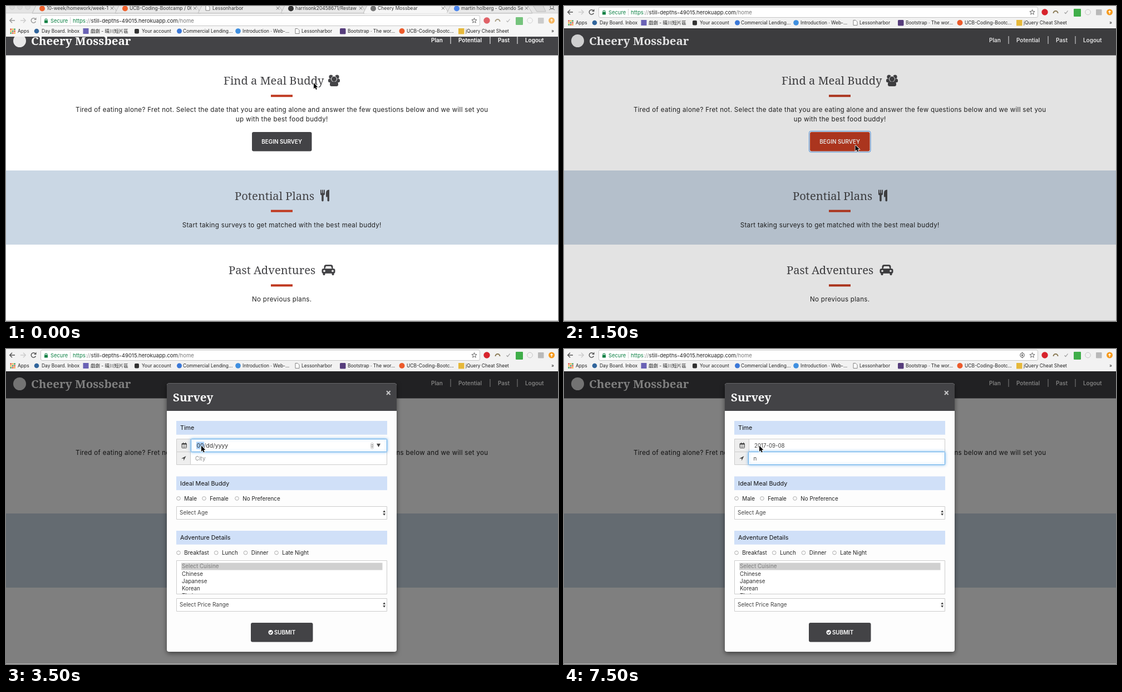
An HTML page with a canvas that plays this animation: 992x565 px, repeating every 8 s.

```html
<!DOCTYPE html>
<html lang="en">
<head>
<meta charset="utf-8">
<title>Meal survey</title>
<style>
html, body { margin: 0; width: 100%; height: 100%; overflow: hidden; background: #fff; }
canvas { display: block; width: 992px; height: 565px; }
</style>
</head>
<body>
<canvas id="stage"></canvas>
<script>
const W = 992, H = 565, LOOP = 8000;
const DARK = '#434346', RED = '#c03b22', BLUE = '#cad7e4', BAR = '#d0e0f8', RING = '#66afe9';
const SANS = 'Inter, "Noto Sans CJK TC", "Noto Sans CJK", sans-serif';
const SERIF = '"Noto Serif", serif';
const ratio = window.devicePixelRatio || 1;

function surface(el) {
  el.width = W * ratio;
  el.height = H * ratio;
  const ctx = el.getContext('2d');
  ctx.scale(ratio, ratio);
  return ctx;
}
const main = surface(document.getElementById('stage'));
const layer = surface(document.createElement('canvas'));
let c = main;

// Value of the last step that has begun
const at = (t, steps) => steps.reduce((v, s) => t >= s[0] ? s[1] : v, steps[0][1]);

function rect(x, y, w, h, fill) { c.fillStyle = fill; c.fillRect(x, y, w, h); }

function round(x, y, w, h, r, fill, stroke) {
  c.beginPath();
  c.roundRect(x, y, w, h, r);
  if (fill) { c.fillStyle = fill; c.fill(); }
  if (stroke) { c.strokeStyle = stroke; c.lineWidth = 1; c.stroke(); }
}

function dot(x, y, r, fill, stroke, width = 1) {
  c.beginPath();
  c.arc(x, y, r, 0, Math.PI * 2);
  if (fill) { c.fillStyle = fill; c.fill(); }
  if (stroke) { c.strokeStyle = stroke; c.lineWidth = width; c.stroke(); }
}

function path(pts, fill, stroke, width = 1) {
  c.beginPath();
  for (let i = 0; i < pts.length; i += 2) c.lineTo(pts[i], pts[i + 1]);
  if (fill) { c.closePath(); c.fillStyle = fill; c.fill(); }
  if (stroke) { c.strokeStyle = stroke; c.lineWidth = width; c.stroke(); }
}

function text(s, x, y, size, color, o = {}) {
  c.font = `${o.weight || 400} ${size}px ${o.serif ? SERIF : SANS}`;
  c.letterSpacing = (o.gap || 0) + 'px';
  c.textAlign = o.align || 'left';
  c.fillStyle = color;
  c.fillText(s, x, y);
  return c.measureText(s).width;
}

/* Browser bar */

function tabs() {
  rect(0, -15, W, 13, '#e4e4e4');
  [2, 16, 30].forEach(x => dot(x + 9, -13, 4.3, '#dcdcdc', '#cfcfcf'));
  const list = [
    [50, '#f0622d', '10-week/homework/week-1'],
    [199, '#f0622d', 'UCB-Coding-Bootcamp / 06'],
    [348, null, 'Lessonharbor'],
    [497, '#333', 'harrisonk20458671/Restaw'],
    [645, '#777', 'Cheery Mossbear'],
    [795, '#4c86ee', 'martin holberg - Quendo Sea']
  ];
  list.forEach(([x, icon, label], i) => {
    const open = i === 4;
    path([x - 3, -2, x + 4, -16, x + 142, -16, x + 151, -2], open ? '#f6f6f6' : '#e9e9e9', '#bbb');
    if (icon) dot(x + 15, -10.5, 5, icon); else page(x + 11, -16);
    c.save();
    c.beginPath();
    c.rect(x + 22, -16, 112, 14);
    c.clip();
    text(label, x + 23, -8, 8.5, '#333');
    c.restore();
    path([x + 138, -13.5, x + 143, -8.5], null, '#666');
    path([x + 143, -13.5, x + 138, -8.5], null, '#666');
  });
  path([947, -16, 954, -5, 970, -5, 965, -16], '#dadada', '#bbb');
  dot(981, -13, 3, null, '#666');
  path([976, -8, 979, -10, 983, -10, 986, -8], null, '#666');
  if (true) rect(0, -2.5, W, 0.7, '#c4c4c4');
  rect(644, -3, 152, 1.5, '#f6f6f6');
}

function page(x, y) {
  path([x, y, x + 4, y, x + 7, y + 3, x + 7, y + 9, x, y + 9, x, y], '#fff', '#666', 0.8);
}

function extensions() {
  dot(864, 11, 5.7, '#d7232c');
  c.beginPath();
  c.arc(883.5, 13, 4, Math.PI, 0);
  c.strokeStyle = '#8a7a55';
  c.lineWidth = 2;
  c.stroke();
  path([899.5, 11.5, 901.5, 13.5, 905.5, 8.5], null, '#999', 1.2);
  round(916, 5, 13, 14, 1, '#3fae49');
  dot(941.5, 11, 4.8, null, '#c4c4c4');
  round(956, 6, 10.5, 10.5, 1, '#b9b9b9');
  dot(980.5, 11, 5.5, '#f79a1c');
  path([980.5, 14, 980.5, 8.5], null, '#fff', 1.4);
  path([977.6, 11, 980.5, 8, 983.4, 11], '#fff');
}

function address(t, active) {
  const ink = active ? '#555' : '#999';
  path([16, 11, 7, 11], null, ink, 1.5);
  path([11, 6.8, 6.8, 11, 11, 15.2], null, ink, 1.5);
  path([26, 11, 35, 11], null, '#ccc', 1.5);
  path([31, 6.8, 35.2, 11, 31, 15.2], null, '#ccc', 1.5);
  c.beginPath();
  c.arc(49.5, 11, 4.2, 0.4, 5.4);
  c.strokeStyle = ink;
  c.lineWidth = 1.5;
  c.stroke();
  path([54.5, 5.5, 54.5, 10, 50, 10], ink);

  round(62.5, 2, 789, 18.5, 2.5, '#fff', '#c6c6c6');
  const green = '#0b8043';
  rect(69, 10.5, 6, 5, green);
  c.beginPath();
  c.arc(72, 10, 2, Math.PI, 0);
  c.strokeStyle = green;
  c.lineWidth = 1.1;
  c.stroke();
  text('Secure', 80, 14.5, 9.4, green);
  rect(115, 5, 0.8, 12, '#ccc');
  let x = 120;
  [['https', green], ['://', '#888'], ['still-depths-49015.herokuapp.com', '#222'], ['/home', '#777']]
    .forEach(([s, color]) => { x += text(s, x, 14.5, 9.6, color); });

  if (t >= 6000) {
    dot(823.5, 11, 3.8, null, '#555');
    dot(823.5, 11, 1.6, '#555');
    path([823.5, 5.5, 823.5, 7.5], null, '#555');
    path([823.5, 14.5, 823.5, 16.5], null, '#555');
  }
  const star = [];
  for (let i = 0; i <= 10; i++) {
    const r = i % 2 ? 2 : 4.8, a = i * Math.PI / 5 - Math.PI / 2;
    star.push(841.5 + r * Math.cos(a), 11.3 + r * Math.sin(a));
  }
  path(star, null, '#555', 0.9);
}

function bookmarks() {
  const hues = ['#e0493a', '#f0a92e', '#3b9e58'];
  for (let i = 0; i < 9; i++) rect(7.5 + i % 3 * 3.4, 25.5 + Math.floor(i / 3) * 3.4, 2.5, 2.5, hues[(i + Math.floor(i / 3)) % 3]);
  dot(55, 30, 4.3, '#31659c');
  round(138.5, 25, 10, 10, 0, '#6a62b5');
  round(231, 26, 8, 8.5, 2, '#333');
  dot(311.5, 30, 4.5, '#3b78d8');
  dot(417, 30, 4.8, '#3f8fe0');
  page(520, 25.5);
  round(600, 25, 10.5, 10.5, 1.5, '#563d7c');
  dot(711.5, 30, 5, '#ec5a2b');
  round(813, 25, 10.5, 10.5, 0, '#e6b83a');
  [[21, 'Apps'], [64, 'Day Board. Inbox'], [152, '戲劇 - 晴川短片區'], [244, 'Your account'],
    [318, 'Commercial Lending...'], [425, 'Introduction · Web-...'], [531, 'Lessonharbor'],
    [614, 'Bootstrap · The wor...'], [720, 'UCB-Coding-Bootc...'], [826, 'jQuery Cheat Sheet'], [980, '»']]
    .forEach(([x, s]) => text(s, x, 33.2, 8.45, '#222'));
}

function browser(t) {
  const active = t >= 1000;
  c.save();
  c.translate(0, t < 250 ? 15 : 0);
  rect(0, -15, W, 55, active ? '#f2f2f2' : '#f6f6f6');
  tabs();
  address(t, active);
  c.globalAlpha = active ? 1 : 0.7;
  extensions();
  c.globalAlpha = 1;
  bookmarks();
  c.restore();
}

/* Page */

function people(x, y) {
  [5, 16].forEach(dx => dot(x + dx, y + 4, 3.6, DARK));
  round(x, y + 7.5, 7, 6.5, 2.5, DARK);
  round(x + 14, y + 7.5, 7, 6.5, 2.5, DARK);
  dot(x + 10.5, y + 8, 5, DARK, '#fff', 0.9);
  round(x + 3, y + 12.5, 15, 8.5, [4, 4, 3, 3], DARK);
}

function cutlery(x, y) {
  [0, 3, 6].forEach(dx => round(x + dx, y, 1.9, 9, 0.9, DARK));
  round(x, y + 6, 7.9, 4, [0, 0, 3, 3], DARK);
  round(x + 2.2, y + 8, 3.5, 13, 1.7, DARK);
  c.beginPath();
  c.moveTo(x + 16, y);
  c.quadraticCurveTo(x + 10, y, x + 10, y + 6);
  c.lineTo(x + 10, y + 13);
  c.lineTo(x + 12.5, y + 13);
  c.lineTo(x + 12.5, y + 20);
  c.quadraticCurveTo(x + 14.5, y + 22, x + 16, y + 20);
  c.fillStyle = DARK;
  c.fill();
}

function car(x, y) {
  round(x + 4, y, 16, 10, [4, 4, 0, 0], DARK);
  path([x + 7.5, y + 2.8, x + 16.5, y + 2.8, x + 18, y + 7, x + 6, y + 7], '#fff');
  round(x, y + 7, 24, 8.8, 3, DARK);
  [2, 18].forEach(dx => round(x + dx, y + 13, 4, 6, 1.8, DARK));
  [4.5, 19.5].forEach(dx => dot(x + dx, y + 11.2, 1.8, '#fff'));
}

function section(title, x, base, icon) {
  text(title, x, base, 20.2, DARK, { serif: true, weight: 500 });
  icon();
  rect(476, base + 18.2, 39, 4, RED);
}

function ring(x, y, w, h, blur) {
  c.save();
  c.shadowColor = 'rgba(90,165,235,.75)';
  c.shadowBlur = blur * ratio;
  round(x, y, w, h, 1, '#fff', RING);
  c.restore();
}

function site(t) {
  rect(0, 0, W, H, '#fff');
  rect(0, 40, W, 48.5, DARK);
  dot(24.5, 62.5, 11.5, '#e8e8e8');
  text('Cheery Mossbear', 45, 70, 20.6, '#fff', { serif: true, weight: 600 });
  [[764, 'Plan'], [813, 'Potential'], [884, 'Past'], [933, 'Logout']]
    .forEach(([x, s]) => text(s, x, 64.5, 9.95, '#fff', { weight: 600 }));
  [798.5, 869.5, 918.5].forEach(x => rect(x, 54, 1, 14, '#fff'));
  rect(0, 295, W, 133, BLUE);

  section('Find a Meal Buddy', 391, 141, () => people(579, 123));
  section('Potential Plans', 411, 347.5, () => cutlery(565, 329.5));
  section('Past Adventures', 400, 481, () => car(567.5, 464));
  const body = (s, y) => text(s, 495.7, y, 11.6, '#222', { gap: 0.3, align: 'center' });
  body('Tired of eating alone? Fret not. Select the date that you are eating alone and answer the few questions below and we will set you', 190);
  body('up with the best food buddy!', 207);
  body('Start taking surveys to get matched with the best meal buddy!', 396.5);
  body('No previous plans.', 529.5);

  if (t >= 1500) round(440.5, 224.5, 110.5, 37.5, 3, '#fff', '#4f9cf0');
  round(442, 226, 107.5, 34.5, 3, t >= 1250 && t < 1750 ? RED : DARK);
  text('BEGIN SURVEY', 495.7, 246.6, 9.9, '#fff', { weight: 600, align: 'center' });

  const shade = at(t, [[0, 0], [1500, 0.11], [1750, 0.5]]);
  rect(0, 40, W, 525, `rgba(0,0,0,${shade})`);
  rect(0, 564, W, 1, '#b4b4b4');
}

/* Survey dialog */

function bar(label, y) {
  rect(306, y, 379, 24.7, BAR);
  text(label, 313, y + 16.3, 10.8, '#111');
}

function box(x, y, w, h, fill = '#fff') { round(x + 0.5, y + 0.5, w - 1, h - 1, 0, fill, '#ccc'); }

function options(y, list) {
  list.forEach(([x, s]) => {
    dot(x, y, 3.3, '#fff', '#a2a2a2', 0.9);
    text(s, x + 10.3, y + 3.6, 9.9, '#222');
  });
}

function menu(label, y) {
  box(306, y, 379, 24);
  text(label, 312, y + 15.2, 9.95, '#444');
  path([677.3, y + 11, 679.7, y + 7.3, 682, y + 11], '#444');
  path([677.3, y + 13, 679.7, y + 16.7, 682, y + 13], '#444');
}

function dateField(t) {
  if (t >= 6000) {
    text('2017-09-08', 342, 176.6, 9.7, '#444');
    return;
  }
  const [value, picked] = at(t, [
    [0, ['mm/dd/yyyy', -1]], [3000, ['mm/dd/yyyy', 0]], [3500, ['00/dd/yyyy', 0]],
    [3750, ['09/dd/yyyy', 1]], [4000, ['09/00/yyyy', 1]], [4500, ['09/08/yyyy', 2]],
    [5250, ['09/08/0002', 2]], [5500, ['09/08/0020', 2]], [5750, ['09/08/0201', 2]]
  ]);
  let x = 342.5;
  value.split('/').forEach((part, i) => {
    if (i) x += text('/', x, 176.6, 10.4, '#444');
    if (i === picked) {
      c.font = `400 10.4px ${SANS}`;
      rect(x - 0.5, 166.5, c.measureText(part).width + 1, 13, '#a9d1fb');
    }
    x += text(part, x, 176.6, 10.4, '#333');
  });
  if (t >= 2500) {
    round(655.5, 168.5, 5, 10.5, 2.5, '#fff', '#c4c4c4');
    path([656.5, 172.8, 658, 170.5, 659.5, 172.8], '#555');
    path([656.5, 174.8, 658, 177.1, 659.5, 174.8], '#555');
    path([666, 169.8, 673, 169.8, 669.5, 176], '#444');
  }
  if (t >= 3750) {
    path([646, 170.5, 651.5, 176], null, '#777', 1.5);
    path([651.5, 170.5, 646, 176], null, '#777', 1.5);
  }
}

function cityField(t) {
  if (t >= 7000) text('n', 340.5, 199.6, 9.9, '#444');
  else text('City', 340, 199.8, 9.9, '#8b8b8b');
  if (t >= 6000 && t < 6500) rect(340, 190, 1, 13, '#222');
  if (t >= 7000 && t < 7500) rect(347.5, 190, 1, 13, '#222');
}

function dateGroup(t) {
  box(306, 161, 27, 24, '#eee');
  box(306, 184, 26, 24, '#eee');
  box(332, 161, 353, 24);
  box(331, 184, 354, 24);
  if (t >= 3000 && t < 6000) ring(332.5, 161.5, 352, 23, 5);
  if (t >= 6000) ring(331.5, 184.5, 353, 23, t < 6250 ? 1 : 5);

  round(316, 169.5, 8.5, 8, 0.8, null, '#444');
  rect(316, 169.5, 8.5, 2, '#444');
  [318, 322].forEach(x => rect(x, 167.8, 1.2, 2.5, '#444'));
  [318.7, 321.4].forEach(x => rect(x, 172, 0.6, 5, '#777'));
  rect(316, 174.4, 8.5, 0.6, '#777');
  path([323.5, 192, 315, 196.6, 319.3, 196.6, 319.3, 200.6], '#444');
  dateField(t);
  cityField(t);
}

function dialog(t) {
  c.save();
  c.shadowColor = 'rgba(0,0,0,.5)';
  c.shadowBlur = 9 * ratio;
  c.shadowOffsetY = 3 * ratio;
  round(289, 61.5, 413, 481.5, 4, '#fdfdfd');
  c.restore();
  round(289, 61.5, 413, 49.5, [4, 4, 0, 0], DARK);
  text('Survey', 300, 93.5, 20.5, '#fff', { serif: true, weight: 600 });
  path([684, 75.3, 690.6, 81.9], null, '#c4c4c5', 2.1);
  path([690.6, 75.3, 684, 81.9], null, '#c4c4c5', 2.1);

  bar('Time', 129);
  dateGroup(t);
  bar('Ideal Meal Buddy', 228.5);
  options(268, [[310, 'Male'], [356, 'Female'], [415, 'No Preference']]);
  menu('Select Age', 282);
  bar('Adventure Details', 326);
  options(365.5, [[310, 'Breakfast'], [377.7, 'Lunch'], [430.5, 'Dinner'], [486, 'Late Night']]);

  box(306, 379, 379, 61);
  rect(315, 383.5, 361.5, 13, '#d0d0d0');
  c.save();
  c.beginPath();
  c.rect(307, 380, 377, 59.5);
  c.clip();
  ['Select Cuisine', 'Chinese', 'Japanese', 'Korean', 'Thai']
    .forEach((s, i) => text(s, 316, 393.4 + i * 13.1, 9.9, i ? '#333' : '#7d7d7d'));
  c.restore();
  menu('Select Price Range', 447);

  round(440, 491, 111.5, 34.5, 3, DARK);
  dot(475.7, 508.3, 4.2, '#fff');
  path([473.5, 508.3, 475.2, 510, 478, 506.8], null, DARK, 1.3);
  text('SUBMIT', 482, 511.8, 9.8, '#fff', { weight: 600 });
}

function survey(t) {
  if (t < 1750) return;
  const entering = t < 2000;
  c = layer;
  c.clearRect(0, 0, W, H);
  dialog(t);
  c = main;
  c.save();
  c.beginPath();
  c.rect(0, 40, W, 524);
  c.clip();
  c.globalAlpha = entering ? 0.89 : 1;
  c.drawImage(layer.canvas, 0, entering ? -37 : 0, W, H);
  c.restore();
}

function pointer(t) {
  const [x, y] = at(t, [
    [0, [553, 138]], [250, [552, 194]], [500, [499, 243]], [750, [497, 247]], [1250, [523.5, 249.5]],
    [1750, [672, 266.5]], [2000, [471, 189]], [2250, [337.5, 122]], [2500, [349, 165.5]], [2750, [351, 173.5]]
  ]);
  const shape = [0, 0, 0, 10.4, 2.4, 8.3, 4, 12, 5.8, 11.2, 4.2, 7.6, 7.4, 7.4];
  const pts = shape.map((v, i) => v + (i % 2 ? y : x));
  path(pts.concat(pts.slice(0, 2)), null, '#fff', 1.6);
  path(pts, '#000');
}

function frame() {
  const t = performance.now() % LOOP;
  site(t);
  survey(t);
  browser(t);
  pointer(t);
  requestAnimationFrame(frame);
}
frame();
</script>
</body>
</html>
```
